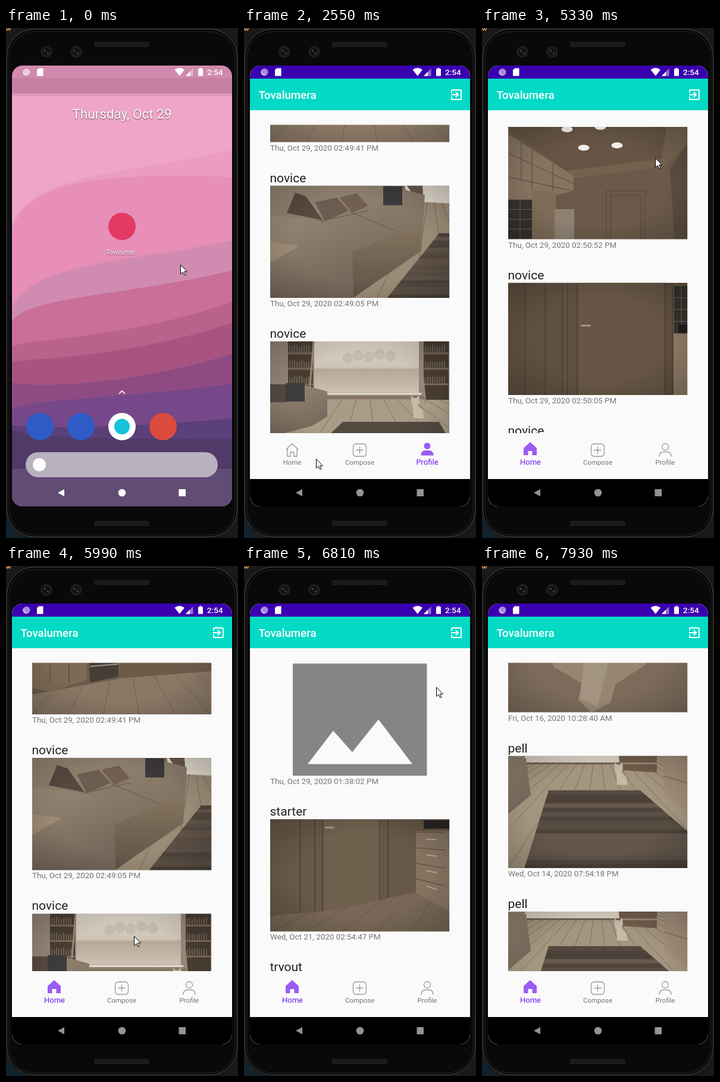
These frames come from a looping animation (390 px wide and 856 px high, 8000 ms). An HTML page:

```html
<!DOCTYPE html>
<html lang="en">
<head>
<meta charset="utf-8">
<title>Photo feed</title>
<style>
  html, body { margin: 0; height: 100%; overflow: hidden; background: #111; }
  svg { display: block; width: 390px; height: 856px; font-family: Roboto, "Noto Sans", sans-serif; }
  .shade { text-shadow: 0 1px 2px #0009; }
  .tabs text { font-size: 11.5px; text-anchor: middle; fill: #757575; }
  .tabs .on text { font-size: 13px; fill: #6a1cf0; }
  .tabs .on path { fill: #9a5bf3; }
  .tabs .off path { fill: none; stroke: #9a9a9a; stroke-width: 1.3; stroke-linejoin: round; }
  .name { font-size: 21px; fill: #212121; }
  .date { font-size: 13.4px; fill: #757575; }
</style>
</head>
<body>
<svg viewBox="0 0 390 856">
  <defs>
    <clipPath id="screen"><rect x="10" y="63" width="370" height="740" rx="18"/></clipPath>
    <clipPath id="reveal"><rect id="hole"/></clipPath>
    <clipPath id="feedBox"><rect x="44" y="162.5" width="301.5" height="517.5"/></clipPath>
    <clipPath id="photoBox"><rect width="301.5" height="188.5"/></clipPath>
    <filter id="soft" x="0" y="0" width="1" height="1"><feGaussianBlur stdDeviation=".7"/></filter>
    <linearGradient id="pane" x2="0" y2="1">
      <stop stop-color="#d9d0c4"/><stop offset=".5" stop-color="#cfc5b7"/>
      <stop offset=".55" stop-color="#b4a897"/><stop offset="1" stop-color="#cdc2b3"/>
    </linearGradient>
    <linearGradient id="cloth" x2=".4" y2="1"><stop stop-color="#988875"/><stop offset="1" stop-color="#75675a"/></linearGradient>
    <linearGradient id="front" x2="0" y2="1"><stop stop-color="#84745f"/><stop offset="1" stop-color="#5f5246"/></linearGradient>
    <radialGradient id="vignette" r=".75"><stop offset=".5" stop-opacity="0"/><stop offset="1" stop-opacity=".25"/></radialGradient>
    <pattern id="mesh" width="3" height="3" patternUnits="userSpaceOnUse">
      <path fill="#151515" d="M0 0h3v3H0z"/><path fill="#2c2c2c" d="M0 0h1.5v1.5H0z"/>
    </pattern>
    <g id="lens"><circle r="10" fill="#1b1d1f"/><circle r="6" fill="#0d0f11"/><path d="M-4-3h3v3h-3zM1 1h3v3H1z" fill="#3a4046"/></g>
    <g id="keys"><path d="M98 774v12l-11-6z"/><circle cx="195" cy="780" r="6.3"/><path d="M290.500 774h11.500v12h-11.500z"/></g>
  </defs>

  <!-- device -->
  <rect width="390" height="856" fill="#191919"/>
  <path d="M0 820v36h40Q8 850 0 820" fill="#12222d"/>
  <path d="M0 0l2 4 2-3 2 3 2-4" fill="none" stroke="#e8a25c" stroke-width="1.3"/>
  <rect x="1.500" y="2" width="387" height="852" rx="46" fill="#060606" stroke="#4b4b4b"/>
  <rect x="5" y="6" width="380" height="845" rx="43" fill="#090909" stroke="#2a2a2a"/>
  <rect x="148" y="23" width="93" height="9" rx="3" fill="url(#mesh)"/>
  <rect x="148" y="827" width="93" height="9" rx="3" fill="url(#mesh)"/>
  <use href="#lens" x="68" y="40"/><use href="#lens" x="118" y="40"/>

  <g clip-path="url(#screen)">
    <!-- launcher -->
    <path fill="#efa5c7" d="M10 63h370v740H10z"/>
    <g id="hills"></g>
    <path fill="#5a1e46" opacity=".2" d="M10 63h370v47H10z"/>
    <path fill="#5a1e46" opacity=".1" d="M10 84h370v30H10z"/>
    <path fill="#fff" opacity=".09" d="M10 740h370v63H10z"/>
    <g fill="#fff" text-anchor="middle" class="shade">
      <text x="195" y="152" font-size="22.500">Thursday, Oct 29</text>
      <text x="195" y="380" font-size="10.500">Tovalumer..</text>
    </g>
    <circle cx="195" cy="333" r="23" fill="#e23a62"/>
    <path d="M190 614l5-5 5 5" fill="none" stroke="#fff" stroke-width="1.700"/>
    <circle cx="57" cy="669" r="23" fill="#2f5bc6"/>
    <circle cx="126" cy="669" r="23" fill="#2f5bc6"/>
    <circle cx="195" cy="669" r="23" fill="#fff"/><circle cx="195" cy="669" r="13" fill="#15c4d8"/>
    <circle cx="264" cy="669" r="23" fill="#dc4a3d"/>
    <rect x="33" y="712" width="323" height="42" rx="21" fill="#b9b1bf"/>
    <circle cx="56" cy="733" r="11" fill="#fff"/>
    <use href="#keys" fill="#fff"/>

    <!-- app -->
    <g clip-path="url(#reveal)"><g id="app">
      <path fill="#fafafa" d="M10 63h370v740H10z"/>
      <path fill="#3a00b0" d="M10 63h370v22H10z"/>
      <path fill="#03dac6" d="M10 85h370v53H10z"/>
      <text x="24.500" y="119" font-size="18.700" font-weight="500" fill="#fff">Tovalumera</text>
      <path transform="translate(345 100)" fill="#fff" d="M10 15.600L11.500 17l5-5-5-5L10 8.400 12.700 11H3v2h9.700zM19 3H5Q3 3 3 5v4h2V5h14v14H5v-4H3v4q0 2 2 2h14q2 0 2-2V5q0-2-2-2z"/>
      <g clip-path="url(#feedBox)"><g id="feed"></g></g>
      <g class="tabs">
        <g class="off" id="homeOff"><path d="M70.500 707.500L81 697.500l10.500 10M73 706v13h5v-7h6v7h5v-13"/><text x="81" y="733">Home</text></g>
        <g class="on" id="homeOn"><path d="M81 695l11 10v12h-7.500v-7h-7v7H70v-12z"/><text x="81.500" y="733">Home</text></g>
        <g class="off"><rect x="183.500" y="698" width="22" height="21" rx="5" fill="none" stroke="#9a9a9a" stroke-width="1.300"/><path d="M194.500 702.500v12M188.500 708.500h12"/><text x="194.500" y="733">Compose</text></g>
        <g class="off" id="userOff"><path d="M302.500 703a5.500 5.500 0 1 0 11 0a5.500 5.500 0 1 0-11 0M298 719.500q0-8 7-8h6q7 0 7 8"/><text x="308" y="733">Profile</text></g>
        <g class="on" id="userOn"><path d="M302.500 701.500a5.500 5.500 0 1 0 11 0a5.500 5.500 0 1 0-11 0M297.500 717.500q0-8.500 7-8.500h7q7 0 7 8.500z"/><text x="308" y="733">Profile</text></g>
      </g>
      <path d="M10 757h370v46H10z"/>
      <use href="#keys" fill="#939393"/>
    </g></g>

    <!-- status bar -->
    <g fill="#fff">
      <circle cx="34.500" cy="74" r="6" opacity=".55"/><path d="M30 70a6 6 0 0 0 8 8a5.500 5.500 0 0 1-8-8" opacity=".7"/>
      <path d="M55 67.500h7.500v13H52v-10z"/>
      <path d="M283.500 70q8-6 16.500 0l-8.200 10.500z"/>
      <path d="M314.500 68v12.500H302z" opacity=".45"/><path d="M309 73.500v7h-7z"/>
      <path d="M325.500 67h3v1.500h2.500v12h-8v-12h2.500z"/>
      <text x="338" y="79" font-size="13.500" font-weight="500">2:54</text>
    </g>
  </g>
  <path id="cursor" d="M.5.500v15.500l3.700-3.300 2.500 5.300 2.300-1-2.400-5.200h4.700z" fill="#fff" stroke="#000" stroke-linejoin="round"/>
</svg>
<script>
const $ = id => document.getElementById(id);
const loop = (n, f) => Array.from({ length: n }, (_, i) => f(i)).join('');
const mix = (a, b, u) => a + (b - a) * u;
let seed = 7;
const random = () => (seed = seed * 16807 % 2147483647) / 2147483647;

// Wallpaper: colour, then height of each ridge at the left, middle and right
$('hills').innerHTML = [
  ['#eb9cc1', 330, 245, 205], ['#e78fb8', 338, 245, 250], ['#d08bb0', 470, 394, 357],
  ['#c96f9a', 492, 450, 407], ['#b8628c', 534, 522, 460], ['#a95480', 560, 555, 495],
  ['#8e4b83', 595, 603, 547], ['#76488a', 640, 622, 597], ['#5b3f78', 667, 672, 655], ['#503a67', 675, 690, 690]
].map(([fill, left, mid, right]) => `<path fill="${fill}" d="M10 ${left}C40 ${mid} 200 ${mid} 380 ${right}V803H10z"/>`).join('');

// Drawing helpers for the photos, each 302 by 189
const shape = (fill, d) => `<path fill="${fill}" d="M${d}z"/>`;
const line = (stroke, d, w = 1) => `<path fill="none" stroke="${stroke}" stroke-width="${w}" d="${d}"/>`;
const rect = (fill, x, y, w, h) => `<rect x="${x}" y="${y}" width="${w}" height="${h}" fill="${fill}"/>`;
const base = fill => rect(fill, 0, 0, 302, 189);
const planks = (x, y) => line('#4a3d3270', loop(24, i => `M${i * 60 - 540} 189L${x} ${y}`));
const seams = (...xs) => line('#42362b90', xs.map(x => `M${x} 0V189`).join(''), 1.5);
const cat = (x, y) => `<g transform="translate(${x} ${y})">` + shape('#c6baa9', '0 0l4 4h5l4-4 1 11-3 6 8 8 3 13H4L3 20 0 11') + '</g>';

// A striped carpet between two edges in perspective
const carpet = (top, a, b, c, d, rows = 18) => loop(rows, i => {
  const u = i / rows, v = (i + 1) / rows, y = mix(top, 189, u), z = mix(top, 189, v) + .5;
  return shape(`hsl(28 14% ${25 + 10 * random()}%)`,
    `${mix(a, c, u)} ${y}H${mix(b, d, u)}L${mix(b, d, v)} ${z}H${mix(a, c, v)}`);
});
const tiles = (x, y, w, h) => rect('#37312c', x, y, w, h) +
  line('#6b6258', loop(4, i => `M${x} ${y + i * h / 4}h${w}`) + `M${x + w / 2} ${y}v${h}`);
const shelf = x => rect('#493d33', x, 0, 42, 98) +
  loop(3, i => line('#7d6b59', `M${x} ${i * 26 + 20}h42`, 3) +
    line('#6d6054', loop(9, j => `M${x + 3 + j * 4} ${i * 26 + 18}v${-8 - 5 * random()}`), 2));

const photos = {
  dog: base('#6f6051') + planks(330, -160) +
    shape('#8c7c6b', '82 97L95 75 136 60 150 36 184 16 225 10 262 34 302 82V189H174L225 138 142 136 92 118') +
    shape('#675849', '97 82L140 70 156 80 148 90 100 103') +
    shape('#6f6051', '160 42L200 24 245 25 255 48 180 58') +
    shape('#7b6b5c', '230 75L268 44 290 78 235 140') +
    shape('#66574a', '258 110L302 84V189H240'),
  ceiling: base('#6b5a49') + shape('#655443', '0 0H302L265 52 95 74') +
    shape('#74624f', '95 74L258 54 266 0H302V28L265 66 95 88') +
    shape('#5d4d3f', '272 70L302 28V189H280') +
    shape('#857360', '0 12L110 82V108L40 122V189H0') +
    line('#54463a', 'M0 84L110 108M0 44L110 95M40 38v68M75 62v46M22 26v62') +
    shape('#7e6c58', '40 105L80 110V189H40') + tiles(0, 122, 40, 66) +
    rect('#8d8173', 78, 138, 33, 51) + line('#514336', 'M165 189v-82h65v82M172 189v-74h51v74') +
    loop(4, i => `<ellipse fill="#f1eeea" cx="${99 + i * 28}" cy="${i % 2 * 33 + 4 - i * 2}" rx="9.5" ry="5"/>`),
  door: base('#5f4f3f') + rect('#665544', 118, 0, 144, 189) + seams(28, 62, 91, 100, 116, 264, 276) +
    line('#a3937e', 'M122 72h17', 3) + rect('#8b7963', 278, 85, 24, 104) + tiles(279, 5, 24, 80) + rect('#1f1c1a', 286, 70, 16, 14),
  kitchen: base('#8a7865') + planks(150, 20) + shape('#6d5b4a', '0 0H302V116L150 128 40 148 0 155') +
    shape('#7d6a56', '0 60H92V130L32 150 0 145') + seams(30, 62).replaceAll('189', '135') +
    shape('#463d35', '95 60H145V125L97 135') + line('#a1968a', 'M97 108l48-4', 2),
  sofa: base('#9a8b76') + planks(270, -10) + carpet(80, 284, 304, 196, 340) +
    shape('#e0d8cc', '226 0H302V30L232 26') + shape('#66584a', '230 0H256L258 26 250 30') +
    shape('url(#cloth)', '0 0H200L260 16 254 110 140 188H0') +
    shape('url(#front)', '138 112L250 66 254 108 140 188') + line('#65574a', 'M134 44l82 34M75 62L165 42') +
    shape('#57493f', '42 12L60 18 88 58 28 46') + shape('#6d5d51', '75 28L112 20 132 42 92 60') +
    shape('#705f52', '117 20L146 13 164 34 138 46') + rect('#3b3939', 190, 1, 32, 32) +
    shape('url(#cloth)', '0 50Q70 56 110 66 137 75 138 110V189H0') + shape('#9c8b76', '0 94L50 101 0 130'),
  window: base('#aa9b86') + planks(160, 40) + rect('#95867a', 0, 0, 302, 98) + shelf(30) + shelf(258) +
    rect('url(#pane)', 74, 0, 176, 86) +
    loop(5, i => `<circle fill="#bdb1a2" opacity=".6" cx="${130 + i * 18}" cy="${20 + 8 * random()}" r="9"/>`) +
    line('#e9e1d6', 'M72 88h182', 3) + line('#83725f', 'M68 94h192', 4) + line('#9a8873', 'M73 0L65 98M251 0l10 105', 3) +
    carpet(135, 122, 284, 65, 315, 8) + shape('url(#cloth)', '0 72L60 74 96 84V126L70 142 0 160') +
    rect('#564940', 0, 72, 28, 30) + rect('#3d3b3b', 26, 70, 32, 31) + cat(237, 91),
  blank: rect('#858585', 38, 0, 225.5, 188.5) + shape('#fafafa', '63 169L106 113 138 149 182 94 239 169'),
  drawers: base('#786756') + planks(330, 30) + shape('#675746', '0 0H302V122H248L95 154 0 162') +
    shape('#6f5f4d', '90 0H186V135L90 155') + line('#4b3e31', 'M50 0v158M75 0v157M88 0v155M184 0v136M198 0v132', 1.5) +
    line('#a99a86', 'M92 14h15', 3) + shape('#857360', '245 20H302V155L245 124') + rect('#292624', 258, 2, 44, 14) +
    loop(4, i => line('#544537', `M245 ${i * 26 + 22}l49 ${i * 4}`) + line('#b2a492', `M262 ${i * 26 + 34}l18 ${i * 2}`, 2)),
  paw: base('#7c6b5b') + planks(150, 330) +
    shape('#96866f', '70 0H240L232 108 180 142 172 172 140 189 118 168 124 140 76 112') +
    shape('#a39381', '128 100H170L150 180 120 165'),
  rug: base('#a4957f') + planks(150, -40) + rect('#d8cfc2', 28, 0, 160, 11) + line('#6b5c4d', 'M30 13h160', 2.5) +
    shape('#705d4b', '186 0H250V28L188 24') + line('#9c8a75', 'M188 13h62', 3) +
    shape('url(#cloth)', '0 0L30 4 38 66 0 98') + shape('#a28e78', '262 0H302V94L262 66') + line('#69584a', 'M262 34l40 12') +
    carpet(58, 68, 222, 27, 374) + cat(179, 11)
};

const posts = [
  ['novice', 'Thu, Oct 29, 2020 02:51:41 PM', 'dog'],
  ['novice', 'Thu, Oct 29, 2020 02:50:52 PM', 'ceiling'],
  ['novice', 'Thu, Oct 29, 2020 02:50:05 PM', 'door'],
  ['novice', 'Thu, Oct 29, 2020 02:49:41 PM', 'kitchen'],
  ['novice', 'Thu, Oct 29, 2020 02:49:05 PM', 'sofa'],
  ['novice', 'Thu, Oct 29, 2020 02:48:32 PM', 'window'],
  ['starter', 'Thu, Oct 29, 2020 01:38:02 PM', 'blank'],
  ['starter', 'Wed, Oct 21, 2020 02:54:47 PM', 'drawers'],
  ['tryout', 'Tue, Oct 20, 2020 11:12:09 AM', 'door'],
  ['pell', 'Fri, Oct 16, 2020 10:28:40 AM', 'paw'],
  ['pell', 'Wed, Oct 14, 2020 07:54:18 PM', 'rug'],
  ['pell', 'Wed, Oct 14, 2020 07:52:36 PM', 'rug']
];
$('feed').innerHTML = posts.map(([name, date, photo], i) => `<g transform="translate(44 ${200.5 + i * 261.5})">
  <text class="name" x="-.5" y="-6">${name}</text>
  <g clip-path="url(#photoBox)">${photo == 'blank' ? photos.blank : `<g filter="url(#soft)">${photos[photo]}${base('url(#vignette)')}</g>`}</g>
  <text class="date" y="202.5">${date}</text></g>`).join('');

// The picture moves in bursts: first step, last step, number of steps
const bursts = [[120, 510, 4], [940, 1300, 4], [1730, 2680, 8], [2820, 2970, 2], [3400, 3840, 4],
  [4140, 5180, 9], [5330, 6290, 8], [6410, 7380, 8], [7530, 7930, 4]];
// Turning points of the pointer and of the feed: time, then position
const pointer = [[0, 293, 397], [510, 191, 331], [1600, 191, 331], [2003, 291, 264], [2544, 121, 723], [2680, 85, 776],
  [2970, 82, 708], [4140, 83, 712], [4270, 90, 687], [4850, 291, 514], [5330, 291, 218], [5467, 290, 152],
  [6015, 215, 621], [6825, 323, 203], [7102, 369, 79]];
const scroll = [[4850, 0], [5330, 296], [6015, 924], [6825, 1605.5], [7930, 2497]];

function snap(t) {
  const burst = bursts.filter(b => b[0] <= t).pop();
  if (!burst) return 0;
  const [a, b, n] = burst, step = (b - a) / (n - 1);
  return a + step * Math.min(n - 1, Math.floor((t - a) / step + .2));
}

function at(keys, t, ease = u => u) {
  const i = Math.max(1, keys.findIndex(k => k[0] >= t)), last = keys[keys.length - 1];
  if (t >= last[0]) return last.slice(1);
  const [a, ...from] = keys[i - 1], [b, ...to] = keys[i];
  const u = ease(Math.max(0, (t - a) / (b - a)));
  return from.map((v, j) => mix(v, to[j], u));
}

const smooth = u => u * u * (3 - 2 * u);
const show = (id, on) => $(id).style.display = on ? '' : 'none';
const move = (id, x, y) => $(id).setAttribute('transform', `translate(${x} ${y})`);

function draw(now) {
  const t = snap(now % 8000), home = t >= 3400;

  // launch: the window opens out of its icon
  const p = Math.min(1, Math.max(0, (t - 820) / 480)), open = 1 - (1 - p) ** 2;
  const box = { x: mix(172, 10, open), y: mix(310, 63, open), width: mix(46, 370, open), height: mix(46, 740, open), rx: mix(23, 0, open) };
  for (const k in box) $('hole').setAttribute(k, box[k]);
  show('app', p > 0);
  move('app', 0, mix(60, 0, open));

  show('homeOn', home); show('homeOff', !home);
  show('userOn', !home); show('userOff', home);
  move('feed', 0, home ? -at(scroll, t)[0] : -982);
  $('feed').setAttribute('opacity', home ? Math.min(1, (t - 3400) / 440) : 1);

  move('cursor', ...at(pointer, t, smooth));
  show('cursor', t < 7200);
}

function frame(now) {
  draw(now);
  requestAnimationFrame(frame);
}
draw(0);
requestAnimationFrame(frame);
</script>
</body>
</html>
```
